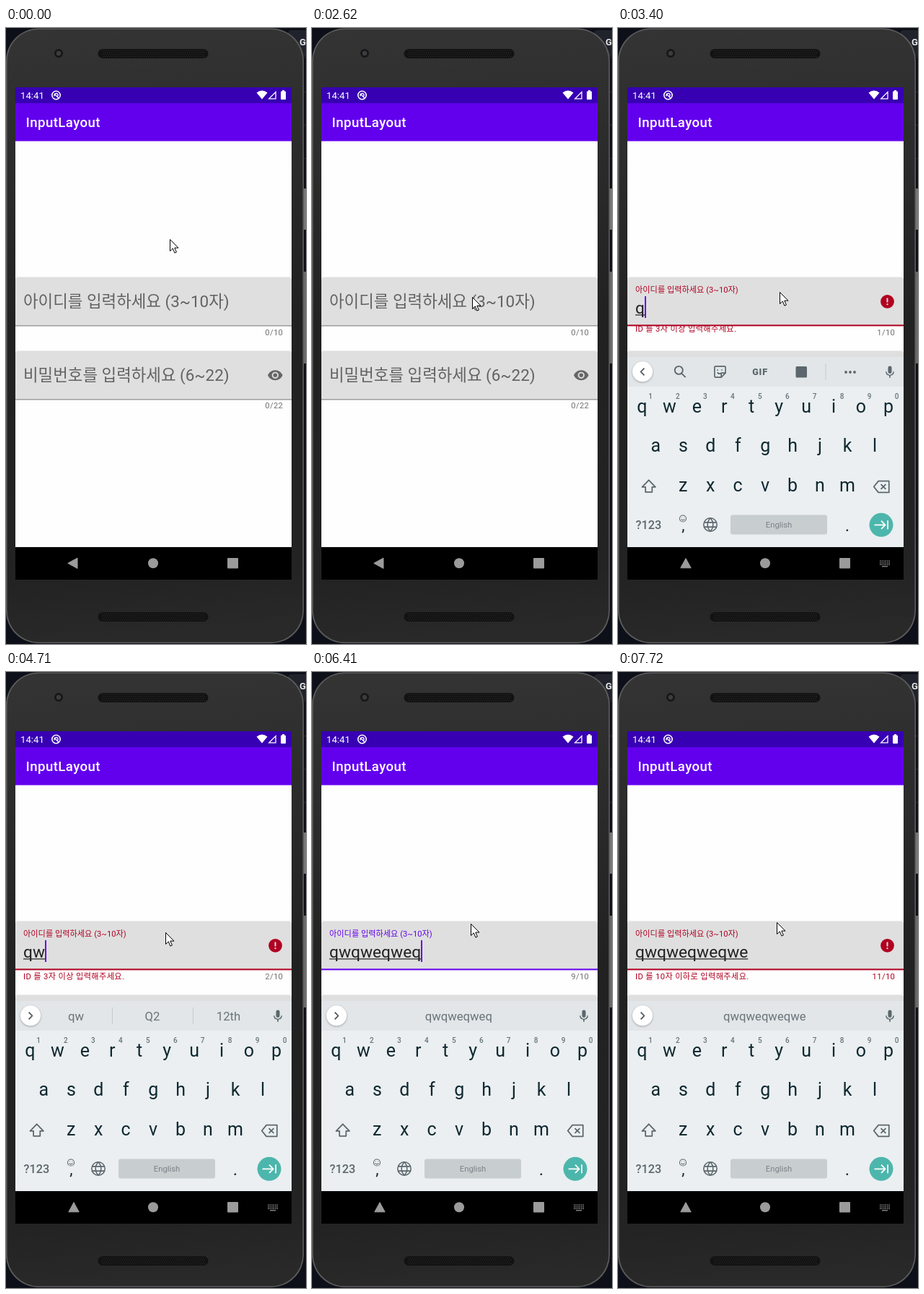
Animation of 416x852 px, one loop 8 s. Source, as an HTML page with a canvas:

```html
<!DOCTYPE html>
<html lang="ko">
<head>
<meta charset="utf-8">
<title>InputLayout</title>
<style>
html, body { margin: 0; width: 100%; height: 100%; overflow: hidden; background: #0e1019; }
canvas { display: block; width: 416px; height: 852px; }
</style>
</head>
<body>
<canvas id="stage" width="416" height="852"></canvas>
<script>
const W = 416, H = 852, LOOP = 8000;
const FONT = 'Roboto, "Noto Sans CJK KR", "Noto Sans CJK", sans-serif';
const PURPLE = '#6200ee', RED = '#b00020', KEY = '#0f2830', SOFT = '#5b676d';
const stage = document.getElementById('stage').getContext('2d');
let g = stage;

const clamp = v => Math.max(0, Math.min(1, v));
const smooth = v => v * v * (3 - 2 * v);
const mix = (a, b, p) => a + (b - a) * p;

function layer(draw) {
  const c = document.createElement('canvas');
  c.width = W;
  c.height = H;
  const prev = g;
  g = c.getContext('2d');
  draw();
  g = prev;
  return c;
}

function rect(x, y, w, h, color) {
  g.fillStyle = color;
  g.fillRect(x, y, w, h);
}

function round(x, y, w, h, r, color) {
  g.beginPath();
  g.roundRect(x, y, w, h, r);
  g.fillStyle = color;
  g.fill();
}

function disc(x, y, r, color) {
  g.beginPath();
  g.arc(x, y, r, 0, Math.PI * 2);
  g.fillStyle = color;
  g.fill();
}

function text(s, x, y, size, color, align = 'left', weight = 400, spacing = 0) {
  g.font = `${weight} ${size}px ${FONT}`;
  g.letterSpacing = spacing + 'px';
  g.textAlign = align;
  g.fillStyle = color;
  g.fillText(s, x, y);
  g.letterSpacing = '0px';
}

// Path on a 24-unit grid, centred on x, y.
function icon(d, x, y, scale, color, line = 0) {
  g.save();
  g.translate(x, y);
  g.scale(scale, scale);
  g.translate(-12, -12);
  g.lineJoin = 'round';
  if (line) {
    g.strokeStyle = color;
    g.lineWidth = line;
    g.stroke(new Path2D(d));
  } else {
    g.fillStyle = color;
    g.fill(new Path2D(d), 'evenodd');
  }
  g.restore();
}

const ICON = {
  eye: 'M12 4.5C7 4.5 2.73 7.61 1 12c1.73 4.39 6 7.5 11 7.5s9.27-3.11 11-7.5c-1.73-4.39-6-7.5-11-7.5z' +
    'M12 17a5 5 0 1 1 0-10 5 5 0 0 1 0 10zM12 9a3 3 0 1 0 0 6 3 3 0 0 0 0-6z',
  mic: 'M12 14a3 3 0 0 0 3-3V5a3 3 0 0 0-6 0v6a3 3 0 0 0 3 3zm5.3-3a5.3 5.3 0 0 1-10.6 0H5a7 7 0 0 0 6 6.7V21h2v-3.3A7 7 0 0 0 19 11z',
  shift: 'M12 2L22 12.5H17V20H7V12.5H2z',
  erase: 'M8 4H23V20H8L1.5 12zM11.5 8.5l7 7M18.5 8.5l-7 7',
  globe: 'M12 2a10 10 0 1 0 0 20 10 10 0 0 0 0-20zM12 2C6.5 8 6.5 16 12 22C17.5 16 17.5 8 12 2M3 8.6H21M3 15.4H21',
  smile: 'M12 2a10 10 0 1 0 0 20 10 10 0 0 0 0-20zM7 14q5 6 10 0M8 8v2M16 8v2',
  next: 'M1 12H18M12 5.5L18.5 12L12 18.5M22.5 5V19',
  search: 'M10 3a6.5 6.5 0 1 0 0 13 6.5 6.5 0 0 0 0-13zM15 15l6 6',
  sticker: 'M5 3H19a2 2 0 0 1 2 2V14l-7 7H5a2 2 0 0 1-2-2V5a2 2 0 0 1 2-2zM21 14H14V21M8 8v2M15 8v2M7.5 13q3 3.5 6 1.5',
  right: 'M9 6l6 6-6 6',
  left: 'M15 6l-6 6 6 6',
  pointer: 'M0 0V16L3.8 12.4L6.4 18.6L8.9 17.5L6.3 11.6H11.5z'
};

function grille(y) {
  round(127.5, y, 153, 13, 6.5, '#121212');
  for (let r = 0; r < 4; r++)
    for (let c = 0; c < 48; c++)
      rect(132.5 + c * 3 + (r % 2) * 1.5, y + 1.6 + r * 2.8, 1.2, 1.2, '#2b2b2b');
}

const phone = layer(() => {
  rect(0, 0, W, H, '#0e1019');
  round(391, 3, 40, 36, 5, '#20232c');
  text('G', 407, 24, 13, '#e8e8e8', 'left', 700);
  [40, 88, 134, 180].forEach(y => rect(413, y, 3, 1, '#272a33'));
  rect(413, 222, 3, 57, '#777');
  rect(413, 337, 3, 127, '#6a6a6a');

  const body = g.createLinearGradient(0, 0, 60, H);
  body.addColorStop(0, '#343434');
  body.addColorStop(0.5, '#212121');
  body.addColorStop(0.9, '#232323');
  body.addColorStop(1, '#292929');
  round(0, 0.5, 413, 850.5, 45, '#5c5c5c');
  round(1.6, 2, 409.8, 847.5, 44, body);
  grille(29);
  grille(808);
  disc(73, 35, 6, '#171717');
  disc(73, 35, 3.2, '#3a3d40');

  rect(13, 156, 383, 562.3, '#fefefe');
  rect(13, 82, 383, 22.3, '#3700b3');
  rect(13, 104, 383, 52.5, PURPLE);
  rect(13, 718, 383, 45, '#000');
  text('14:41', 20, 98, 13.2, '#fff');
  text('InputLayout', 27.5, 137, 18.65, '#fff', 'left', 500, 0.42);

  g.strokeStyle = '#fff';
  g.lineWidth = 1.6;
  g.beginPath();
  g.arc(69.5, 93, 5.7, 0, Math.PI * 2);
  g.stroke();
  g.lineWidth = 1.4;
  g.beginPath();
  g.arc(69.5, 93, 2.6, 2.6, 6.9);
  g.moveTo(67, 91);
  g.lineTo(73, 97);
  g.stroke();

  g.fillStyle = '#fff';
  g.beginPath();
  g.moveTo(355, 98.5);
  g.lineTo(347.5, 89.5);
  g.quadraticCurveTo(355, 83.5, 362.5, 89.5);
  g.fill();
  g.lineWidth = 1.3;
  g.beginPath();
  g.moveTo(374, 88.5);
  g.lineTo(374, 97.8);
  g.lineTo(364.7, 97.8);
  g.closePath();
  g.stroke();
  round(381, 87.5, 7, 11.5, 1, '#fff');
  rect(383, 86, 3, 2, '#fff');
});

const keys = layer(() => {
  rect(13, 455, 383, 263, '#ebeff1');
  rect(13, 455, 383, 41, '#e2e6e9');
  const row = (s, x, y) =>
    [...s].forEach((c, i) => text(c, x + i * 37.95, y, 25, KEY, 'center'));
  row('qwertyuiop', 33.4, 531.5);
  row('asdfghjkl', 52.4, 586);
  row('zxcvbnm', 90.2, 640.5);
  [...'1234567890'].forEach((c, i) => text(c, 45 + i * 37.95, 513, 10, '#66747a', 'center', 500));
  icon(ICON.shift, 42.7, 634.5, 0.92, SOFT, 1.9);
  icon(ICON.erase, 365, 634.5, 0.98, SOFT, 1.8);
  text('?123', 24.5, 692.5, 16.3, SOFT, 'left', 500);
  icon(ICON.smile, 90, 678.5, 0.46, SOFT, 2.2);
  text(',', 90.5, 695, 22, KEY, 'center');
  icon(ICON.globe, 128, 687, 0.92, SOFT, 1.7);
  round(156, 673.5, 134, 27, 3, '#c8cdd0');
  text('English', 223, 691, 11.3, '#7b8388', 'center');
  text('.', 318, 696, 24, KEY, 'center');
  disc(365, 687.3, 16.5, '#4db6ac');
  icon(ICON.next, 365, 687.3, 0.86, '#fff', 2.1);
  icon(ICON.mic, 377, 476, 0.85, SOFT);
});

const WORD = 'qwqweqweqwe';
const TYPED = [3320, 3550, 5420, 5500, 5570, 5800, 5950, 6030, 6410, 6490, 7260];
const CARET_OFF = [[0, 2700], [3170, 3320], [4250, 4710], [5170, 5420], [6950, 7260], [7720, 8000]];

// start, end, steps, x, y
const MOVES = [
  [280, 280, 1, 227, 291], [450, 450, 1, 226, 291],
  [680, 1210, 8, 219, 362], [1380, 1460, 2, 220, 368],
  [1530, 1610, 2, 220, 376], [2160, 2160, 1, 220, 375],
  [2540, 2780, 4, 224, 369], [3320, 3400, 2, 224, 365],
  [3870, 3940, 2, 223, 362], [4170, 4250, 2, 222, 362],
  [4710, 4710, 1, 221, 360], [4790, 5170, 6, 220, 348],
  [6490, 6490, 1, 220, 346]
];

function pointer(t) {
  let x = 227, y = 292;
  for (const [a, b, n, tx, ty] of MOVES) {
    if (t < a) break;
    const k = b > a ? Math.floor((t - a) / (b - a) * (n - 1) + 0.01) + 1 : n;
    const p = Math.min(1, k / n);
    x = mix(x, tx, p);
    y = mix(y, ty, p);
  }
  icon(ICON.pointer, Math.round(x) + 12.5, Math.round(y) + 12.5, 1, '#fff');
  icon(ICON.pointer, Math.round(x) + 12.5, Math.round(y) + 12.5, 1, '#000', 1);
}

function fieldBox(y, line, thick) {
  round(13, y - 0.4, 383, 67.4, [4, 4, 0, 0], '#dfdfdf');
  rect(13, y + 67.4 - thick, 383, thick, line);
}

function counter(s, y, color) {
  text(s, 384.2, y, 11.2, color, 'right', 400, 0.37);
}

function helper(t, n, error) {
  const s = n > 10 ? 'ID 를 10자 이하로 입력해주세요.' : 'ID 를 3자 이상 입력해주세요.';
  const fade = error ? 1 : n ? 1 - clamp((t - 5420) / 150) : 0;
  if (!fade) return;
  const p = smooth(clamp((t - (n > 10 ? 7260 : 3320) - 30) / 190));
  g.save();
  g.beginPath();
  g.rect(13, 412, 383, 34);
  g.clip();
  g.globalAlpha = fade;
  text(s, 24, 424.5 - 5 * (1 - p), 11.2, RED, 'left', 400, 0.37);
  g.restore();
}

function fields(t, n) {
  const error = n > 10 || n === 1 || n === 2;
  const focus = t >= 2700;
  const tone = error ? RED : PURPLE;
  fieldBox(345, focus ? tone : '#777', focus ? 2 : 1);
  const p = smooth(clamp((t - 2700) / 170));
  text('아이디를 입력하세요 (3~10자)', 24, mix(386, 366, p), mix(22.4, 11.2, p), focus ? tone : '#626262');
  const s = WORD.slice(0, n);
  text(s, 24, 394.5, 22.75, '#212121');
  const w = n ? g.measureText(s).width : 0;
  if (n) rect(24, 396.3, w, 1.2, '#212121');
  if (!CARET_OFF.some(([a, b]) => t >= a && t < b)) rect(Math.round(24 + w), 371, 2, 30, PURPLE);
  if (error) {
    disc(373.5, 378.3, 9.4, RED);
    rect(372.5, 373.5, 2, 6, '#dfdfdf');
    rect(372.5, 381.2, 2, 2, '#dfdfdf');
  }
  helper(t, n, error);
  counter(n + '/10', 424.5, error && n > 10 ? RED : '#707070');

  fieldBox(447, '#777', 1);
  text('비밀번호를 입력하세요 (6~22)', 24, 487.5, 22.4, '#626262');
  icon(ICON.eye, 373.3, 480.3, 0.932, '#666');
  counter('0/22', 526, '#707070');
}

function navBar(t) {
  const color = '#9b9b9b';
  const down = smooth(clamp((t - 2700) / 310));
  const angle = t < 2700 ? 0 : t < 2860 ? Math.PI * clamp((t - 2700) / 155) : Math.PI * (1 + 0.5 * clamp((t - 2860) / 150));
  g.save();
  g.translate(mix(92.5, 94, down), 740.3);
  g.rotate(-angle);
  g.beginPath();
  g.moveTo(-6.7, 0);
  g.lineTo(6.5, -7.2);
  g.lineTo(6.5, 7.2);
  g.closePath();
  g.lineJoin = 'round';
  g.lineWidth = 1;
  g.fillStyle = g.strokeStyle = color;
  if (angle > Math.PI) g.scale(-1, 1);
  g.fill();
  g.stroke();
  g.restore();
  disc(204, 740.3, 7, color);
  round(307, 733, 15, 14.5, 1, color);
  if (t < 2780) return;
  g.globalAlpha = clamp((t - 2700) / 230);
  for (let r = 0; r < 3; r++)
    for (let c = 0; c < 6; c++) rect(363 + c * 2.5, 736.5 + r * 2.5, 1.5, 1.5, '#858585');
  rect(366, 744, 8, 1.4, '#858585');
  g.globalAlpha = 1;
}

function strip(t, n) {
  const open = t >= 2930 && t < 3470;
  g.save();
  g.shadowColor = 'rgba(0,0,0,.3)';
  g.shadowBlur = 3;
  g.shadowOffsetY = 1;
  disc(34, 475.3, 14, '#fff');
  g.restore();
  icon(open ? ICON.left : ICON.right, 34, 475.5, 0.8, '#4a5358', 2.2);
  const line = x => rect(x, 464, 1, 23, '#c3c9cc');
  const word = (s, x) => text(s, x, 482, 16.7, '#6a7479', 'center');
  if (open) {
    icon(ICON.search, 86, 475.5, 0.85, SOFT, 2.2);
    icon(ICON.sticker, 141.5, 475.5, 0.84, SOFT, 2);
    text('GIF', 197, 480, 12.5, SOFT, 'center', 900, 0.8);
    round(246.5, 468, 15.5, 15.5, 1.5, SOFT);
    line(287.5);
    [316, 322, 328].forEach(x => disc(x, 476, 1.9, SOFT));
  } else if (n === 2 && t >= 3620) {
    word('qw', 97);
    word('Q2', 203);
    word('12th', 308.5);
    line(147);
    line(259);
  } else if (n > 2) {
    word(WORD.slice(0, n), 203.3);
  }
}

function keyboard(t, n) {
  if (t < 2780) return;
  const step = Math.min(3, Math.floor((t - 2780) / 76.7 + 0.05));
  const board = layer(() => {
    g.drawImage(keys, 0, 0);
    strip(t, n);
  });
  g.save();
  g.beginPath();
  g.rect(13, 82, 383, 681);
  g.clip();
  g.globalAlpha = [0.3, 0.68, 0.92, 1][step];
  g.drawImage(board, 0, [30, 26, 10, 0][step]);
  g.restore();
}

function draw(t) {
  const n = TYPED.filter(at => t >= at).length;
  g.drawImage(phone, 0, 0);
  fields(t, n);
  navBar(t);
  keyboard(t, n);
  pointer(t);
}

let start;
function tick(now) {
  start ??= now;
  draw((now - start) % LOOP);
  requestAnimationFrame(tick);
}
requestAnimationFrame(tick);
</script>
</body>
</html>
```
